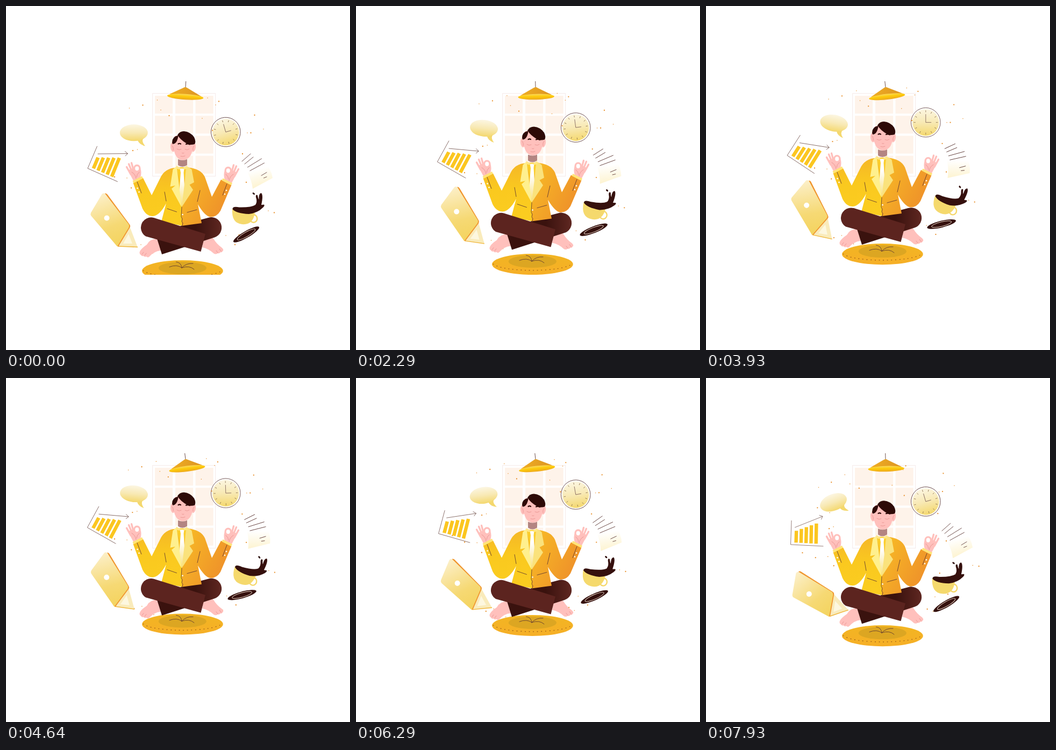
Write an HTML page that moves like this. It is 640 px wide and 640 px high and loops after 8000 ms.

```html
<!DOCTYPE html>
<html lang="en">
<head>
<meta charset="utf-8">
<title>Floating meditation</title>
<style>
  html, body { margin: 0; width: 100%; height: 100%; overflow: hidden; background: #fff; }
  svg { display: block; width: 100vw; height: 100vh; }
  .line { fill: none; stroke: #5b3632; stroke-width: .85; stroke-linecap: round; stroke-linejoin: round; }
  .soft { stroke: #7a5c56; stroke-width: .8; }
  .skin { fill: #ffc0bc; }
  .finger { fill: none; stroke: #ffc0bc; stroke-width: 3.4; stroke-linecap: round; }
  .crease { fill: none; stroke: #e58f8c; stroke-width: .8; stroke-linecap: round; }
  .dark { fill: #2d0a07; }
  .cuff { stroke: #ffe478; stroke-width: 4.5; }
</style>
</head>
<body>
<svg viewBox="0 0 640 640" xmlns="http://www.w3.org/2000/svg">
  <defs>
    <clipPath id="frame"><rect y="140" width="640" height="360"/></clipPath>
    <linearGradient id="gold" x1="0" y1="0" x2="0" y2="1">
      <stop offset="0" stop-color="#fcf6e2"/><stop offset=".5" stop-color="#f8e9b4"/><stop offset="1" stop-color="#f4d86e"/>
    </linearGradient>
    <linearGradient id="lid" x1=".25" y1="0" x2=".5" y2="1">
      <stop offset="0" stop-color="#fcf0cb"/><stop offset=".65" stop-color="#f6d974"/><stop offset="1" stop-color="#f4d461"/>
    </linearGradient>
    <linearGradient id="sheet" x1=".35" y1="0" x2=".6" y2="1">
      <stop offset=".25" stop-color="#fff"/><stop offset="1" stop-color="#fdf2ca"/>
    </linearGradient>
    <linearGradient id="cone" x1="0" y1="0" x2="1" y2="0">
      <stop offset="0" stop-color="#f0ae22"/><stop offset="1" stop-color="#dc9422"/>
    </linearGradient>
    <linearGradient id="shade" x1="0" y1="0" x2="0" y2="1">
      <stop offset="0" stop-color="#fbd95a"/><stop offset=".45" stop-color="#fdca09"/><stop offset="1" stop-color="#eda820"/>
    </linearGradient>
    <linearGradient id="yellow" x1="0" y1="0" x2="0" y2="1">
      <stop offset="0" stop-color="#f5b727"/><stop offset=".45" stop-color="#fac91f"/><stop offset="1" stop-color="#fbcd20"/>
    </linearGradient>
    <linearGradient id="orange" x1="0" y1="0" x2="1" y2=".6">
      <stop offset="0" stop-color="#f8bd25"/><stop offset="1" stop-color="#ee8f2a"/>
    </linearGradient>
    <linearGradient id="tie" x1="0" y1="0" x2="0" y2="1">
      <stop offset=".3" stop-color="#fff"/><stop offset="1" stop-color="#f8df78"/>
    </linearGradient>
    <linearGradient id="leg" x1="0" y1="0" x2="1" y2="0">
      <stop offset="0" stop-color="#3a120e"/><stop offset=".6" stop-color="#3a120e"/><stop offset="1" stop-color="#5f2721"/>
    </linearGradient>
    <linearGradient id="rug" x1="0" y1="0" x2="0" y2="1">
      <stop offset="0" stop-color="#f2b522"/><stop offset="1" stop-color="#f6af27"/>
    </linearGradient>
    <g id="hand">
      <path class="skin" d="M227 306L238 327L250 320Q253 309 250 302Q246 309 240 308L235 302Z"/>
      <path class="finger" d="M232 313L224.5 299.5M235 310L228.5 294M238 308L233.5 292"/>
      <ellipse cx="243.7" cy="302.3" rx="5.2" ry="5.8" class="finger" style="fill:#fff"/>
      <path class="crease" d="M234 309Q241 313 242 321M248 309Q243 313 243 318"/>
    </g>
  </defs>

  <g clip-path="url(#frame)">
    <g id="window">
      <rect x="272.7" y="162.7" width="117" height="154" fill="#fff" stroke="#f5e9e8"/>
    </g>

    <g id="clock">
      <circle r="27.3" fill="#fff" stroke="#6b4b49" stroke-width=".9"/>
      <circle r="24.8" fill="url(#gold)"/>
      <g id="ticks" stroke="#8f7350" stroke-width=".85"/>
      <path class="line soft" d="M0-15V0H10"/>
    </g>

    <g id="dots" fill="#e8922f"/>

    <g id="lamp">
      <path class="line" d="M334 130V152"/>
      <path fill="url(#cone)" d="M305 166L330 152.5Q334 149.5 338 152.5L364 166Z"/>
      <ellipse cx="334.8" cy="169" rx="33.8" ry="5.3" fill="url(#shade)"/>
    </g>

    <g id="bubble">
      <ellipse cx="237.8" cy="235.8" rx="26" ry="15.5" fill="url(#gold)"/>
      <path fill="#f4d86e" d="M242 250.500Q250 250 256 246Q251 251 259 260.500Q248 258 245 250Z"/>
    </g>

    <g id="chart">
      <path class="line soft" d="M159 265.5L157.5 310L218 313M165.5 278L217 257.5M211 255.5L217 257.5L214.5 263"/>
      <g id="bars" fill="#fbc620"/>
    </g>

    <g id="laptop">
      <path fill="#f9ebbb" d="M230 410L245 449L208 447Z"/>
      <path fill="#fdf7df" d="M228 424L235 442L218 442Z"/>
      <path fill="none" stroke="#f0b63b" stroke-width="1.4" d="M208 447L245 448.5"/>
      <path fill="#f0952e" d="M184 348.5Q187 348 189 351L230 406.500Q232 409 230.500 412L209 447.500L206 446Z"/>
      <path fill="url(#lid)" d="M178.500 350Q181.500 346.500 185 350L228.500 406.500Q230 409 228.500 412L207 447.500L158.500 390.500Q156.500 387.500 158 384.500Z"/>
      <circle cx="187.5" cy="394.500" r="5" fill="#fff"/>
    </g>

    <g id="paper">
      <path fill="url(#sheet)" d="M449 309L481 291Q494 304 496 320L459 340Q457 324 449 309Z"/>
      <path class="line" d="M439 289L455 275M444 294L460 281M449.5 300L475.5 284M454 306.5L480.5 292M475 315.5L485 309.5M479.5 320L485 317.8"/>
    </g>

    <g id="cup">
      <g transform="translate(447 425) rotate(-30)">
        <ellipse rx="27.6" ry="6.2" fill="#34100d"/>
        <ellipse rx="19.2" ry="4.2" fill="none" stroke="#f4e3d5" stroke-width=".9"/>
      </g>
      <ellipse cx="460.5" cy="395.5" rx="6.800" ry="7.200" fill="#fff" stroke="#f5d86c" stroke-width="2.4"/>
      <path fill="#f5d96d" d="M421 377Q419 404 439 406Q460 408 463 384Q445 390 421 377Z"/>
      <path fill="#35100d" d="M421.500 378Q421 372 434 374.500Q456 375 464 370Q468 364 465 356Q464 350 468 352Q469 358 470.500 360Q470 348 475 348Q479 352 475 370L480 369.500Q482 371 478 375Q468 385 452 387Q428 386 421.500 378Z"/>
      <ellipse cx="460.8" cy="349" rx="2.5" ry="1.5" class="dark" transform="rotate(35 460.8 349)"/>
    </g>

    <g id="mat">
      <ellipse cx="328.4" cy="492.7" rx="75.400" ry="19.600" fill="url(#rug)"/>
      <path d="M255 492A75 15 0 0 0 402 492" fill="none" stroke="#9d5c17" stroke-width="1.3" stroke-dasharray="1.8 5.8"/>
      <ellipse cx="328.4" cy="487.5" rx="44.6" ry="11.6" fill="#dca622"/>
      <path class="line" d="M327 487Q318 480 304 485.5M327 487Q326 477 316.5 476M327 487Q335 478 348 479M327 487Q341 482 350 490"/>
    </g>

    <g id="man">
      <path class="skin" d="M284 433Q268 432 262 444Q250 452 248.500 458Q248 462 251 463Q252 466 256 465Q258 468 261 466Q264 469 267 466Q276 456 288 455Z"/>
      <path class="skin" d="M368 431Q379 427 386 433Q392 443 402 450Q406 454 403 456Q402 459 399 458Q397 461 394 460Q390 463 386 460Q378 452 365 449Z"/>
      <path class="crease" d="M253 462L256 458M258 464L261 460M400 456L397 452M394 459L391 455"/>

      <use href="#hand"/>
      <use href="#hand" transform="translate(657 4) scale(-1 1)"/>

      <path class="skin" d="M312 246Q312 240 329 240Q346 240 347 252L346 271Q343 285 329 287Q316 285 313 270Z"/>
      <ellipse cx="310" cy="263" rx="4" ry="8.5" class="skin" transform="rotate(-8 310 263)"/>
      <ellipse cx="349" cy="263" rx="4" ry="8.5" class="skin" transform="rotate(8 349 263)"/>
      <path class="dark" d="M309 254Q309 243 320 241Q321 244 318 251Q315 257 310 257Z"/>
      <path class="dark" d="M319 240Q323 233 331 233Q343 234 350 244Q354 252 351 257Q345 259 338 257Q324 249 319 240Z"/>
      <path d="M320.5 256.5Q323 255 325 256.5M335 257Q338 255.5 342 257.5" fill="none" stroke="#2d0a07" stroke-width="2.2" stroke-linecap="round"/>
      <path class="crease" d="M318 266Q322 269 326 266.5M333 266.5Q337 269 341 266M327.5 273.5Q329 275 331 273.5M325 279.5Q329 281 333 279M309 260Q312 263 311 268M350 260Q347 263 348 268"/>

      <path fill="url(#leg)" d="M376 394L331 406L281 433L290 462L388 430.500A19 19 0 0 0 376 394Z"/>

      <path fill="#fbce2c" d="M315 300H340L333 345L327 374L320 345Z"/>
      <path fill="url(#yellow)" d="M317 300.500Q295 302 287 320L271 352L255 320L236.500 329L254 377Q261 391 273 391Q286 390 298 367L289 401L328 409V340Z"/>
      <path fill="url(#orange)" d="M338 300.500Q362 302 370 318L383 355L400 323L419.500 333L399 381Q392 393 380 392.500Q370 391 357 369L364 404L327 409V340Z"/>
      <path fill="#b38582" d="M320 285Q329 289 337 285V296Q328 302 320 296Z"/>
      <path fill="url(#tie)" d="M323.500 302H331.500L330.500 310L333 350L327 374L322 350L325 310Z"/>
      <path fill="#fff08e" d="M316 299L310.500 304L305.500 336L315 334L308 340L326.500 374L323 342L318 302Z"/>
      <path fill="#fae27c" d="M338 299L345.500 304L350 328L341.500 332.500L348 342L327 374L331 340L335 302Z"/>
      <path fill="#ffe785" d="M317 297L327 303L337 297L338 302L332 304L327 302L322 304L316 302Z"/>
      <path class="line" d="M295 346L298 363M361 343L356 364M300 377L317.5 383M337 384L355 379M244 327L252 348M411 331L403 352M327 374L326 392L328 396L327 401L329 404L328 409"/>
      <path class="cuff" d="M236.5 327.5L254 318.5M402.5 322.5L420 331.5"/>
      <g fill="#fff">
        <circle cx="244.5" cy="339" r="1.3"/><circle cx="247.5" cy="346" r="1.3"/>
        <circle cx="410" cy="343" r="1.3"/><circle cx="407" cy="350" r="1.3"/>
        <circle cx="328.5" cy="388" r="1.3"/>
      </g>

      <path fill="#5c241f" d="M275 394L371 424L362.5 457L260 428.5A19 19 0 0 1 275 394Z"/>
    </g>
  </g>
</svg>
<script>
const $ = id => document.getElementById(id);
const LOOP = 8000;
const TIMES = [0, 1000, 2290, 3930, 5430, 6290, 7930];

function add(parent, tag, attrs) {
  const node = document.createElementNS('http://www.w3.org/2000/svg', tag);
  for (const key in attrs) node.setAttribute(key, attrs[key]);
  $(parent).append(node);
}

for (const x of [277, 315, 352.5])
  for (let row = 0; row < 4; row++)
    add('window', 'rect', { x, y: 167 + row * 37.2, width: 33.2, height: 33.2, fill: '#fef3ea' });

for (let i = 0; i < 12; i++)
  add('ticks', 'path', { d: 'M0-22.5V-19', transform: `rotate(${i * 30})` });

for (let i = 0; i < 5; i++) {
  const x = 164.3 + i * 9.3, top = 284.3 - i * 3.4, base = 306.3 + i * .5;
  add('bars', 'path', { d: `M${x + .7} ${top}h6.4L${x + 6.4} ${base}h-6.4Z` });
}

const SMALL = [[229.5, 190], [281.5, 175], [288, 193.5], [365, 209], [375, 171], [390, 184], [479, 229],
  [449, 236], [488, 381], [409, 427], [251, 444], [225, 320], [244.5, 267], [242, 240], [273, 460], [401, 453]];
const LARGE = [[254.5, 184.5], [303.5, 204], [396, 177.5], [384, 231.5], [462.5, 203], [455.5, 236], [447, 328],
  [499, 384.5], [426, 444], [233, 338.5], [202, 318], [236, 269], [425, 385], [433.5, 426], [440, 275],
  [221, 227], [179.5, 305], [391, 447], [236.5, 448]];
for (const [cx, cy] of SMALL) add('dots', 'circle', { cx, cy, r: .75 });
for (const [cx, cy] of LARGE) add('dots', 'circle', { cx, cy, r: 1.15 });

// Smooth curve through values at TIMES
function track(values) {
  const last = values.length - 1;
  const slope = i => {
    const a = Math.max(i - 1, 0), b = Math.min(i + 1, last);
    return (values[b] - values[a]) / (TIMES[b] - TIMES[a]);
  };
  return t => {
    let i = 0;
    while (i < last - 1 && t > TIMES[i + 1]) i++;
    const span = TIMES[i + 1] - TIMES[i], u = (t - TIMES[i]) / span, v = 1 - u;
    return v * v * (1 + 2 * u) * values[i] + u * u * (3 - 2 * u) * values[i + 1]
      + span * u * v * (v * slope(i) - u * slope(i + 1));
  };
}

const leftTurn = track([0, 2, 5.8, 9.7, -1.2, -8, -21.1]);
const rightTurn = track([0, 2.5, 8.5, 16, 10.5, 6, -.3]);
const dotTurn = track([0, -.1, -.25, -.65, -1.2, -2.3, -9.6]);
const lampTurn = track([3.8, 2.2, -1.5, -6.5, -7, -6.3, -1.5]);
const matLift = track([0, -1.9, -12.2, -31, -36, -32.2, -13]);

// Eased rise to the peak at 5250 ms, then eased fall
function bodyLift(t) {
  const phase = t < 5250 ? t / 5250 : (9150 - t) / 3900;
  return -21 * (1 - Math.cos(Math.PI * phase)) / 2;
}

const move = (id, transform) => $(id).setAttribute('transform', transform);
const floatTurn = (id, dy, angle, x, y) => move(id, `translate(0 ${dy}) rotate(${angle} ${x} ${y})`);

function draw(t) {
  const dy = bodyLift(t);
  const left = leftTurn(t), right = rightTurn(t);
  move('man', `translate(0 ${dy})`);
  move('mat', `translate(0 ${matLift(t)})`);
  move('lamp', `rotate(${lampTurn(t)} 334 151)`);
  move('clock', `translate(408.8 ${234.5 + dy}) rotate(${right - 16})`);
  move('chart', `translate(188.3 ${293.6 + dy}) rotate(${left + 21.1}) translate(-188.3 -289)`);
  floatTurn('bubble', dy, left, 238, 238);
  floatTurn('laptop', dy, left, 222, 389);
  floatTurn('paper', dy, right, 462, 305);
  floatTurn('cup', dy, right, 447, 393);
  floatTurn('dots', dy, dotTurn(t), 327, 318);
}

const begin = performance.now();
function tick() {
  draw((performance.now() - begin) % LOOP);
  requestAnimationFrame(tick);
}
tick();
</script>
</body>
</html>
```
